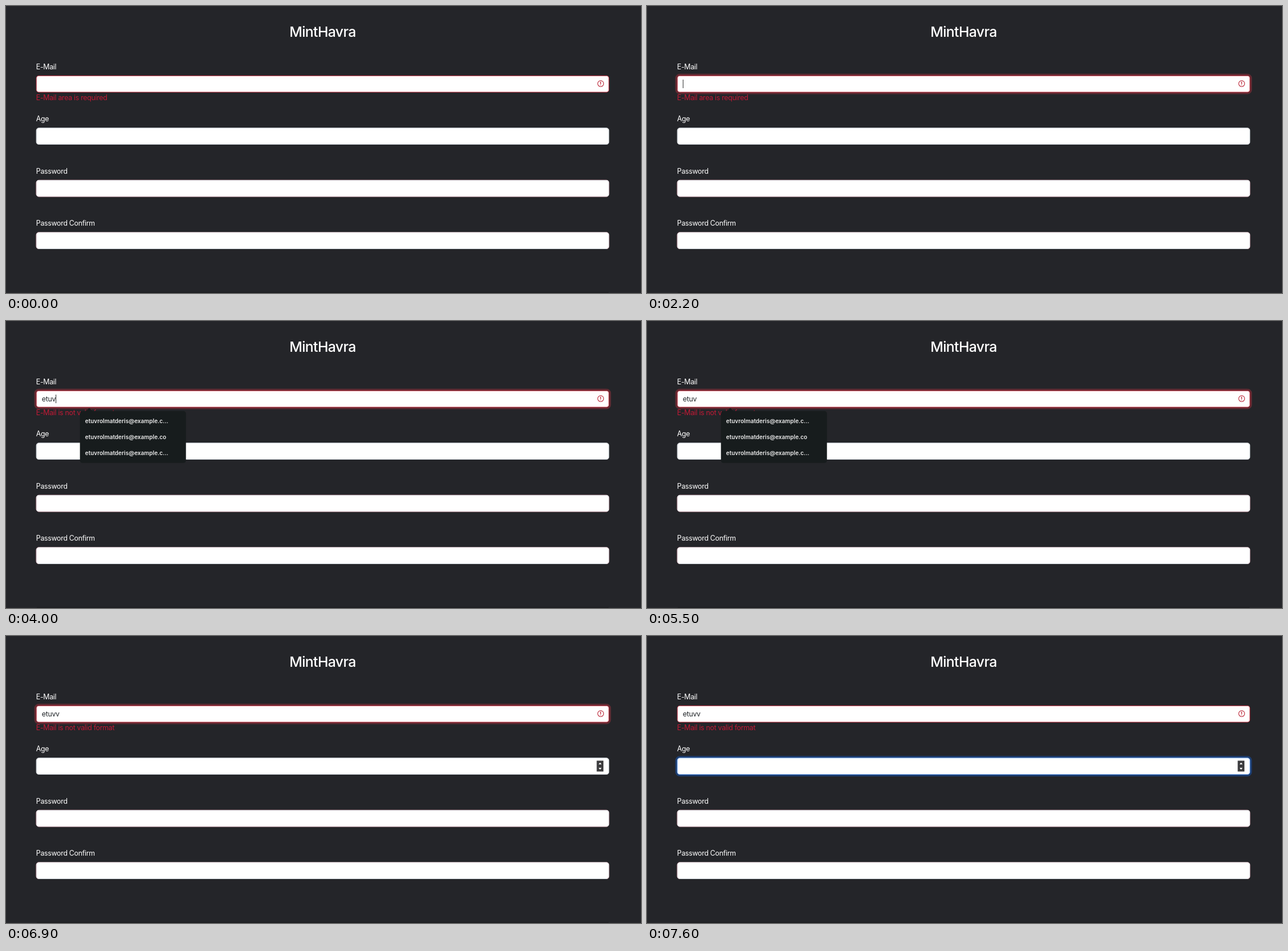
An HTML page that plays this animation: 1114 px wide and 503 px high, repeating every 8000 ms.

```html
<!DOCTYPE html>
<html lang="en">
<head>
<meta charset="utf-8">
<title>Sign-up form</title>
<style>
  html, body { margin: 0; width: 100%; height: 100%; overflow: hidden; background: #242529; }
  svg { display: block; }
  text { font: 400 12.4px Inter, "Open Sans", sans-serif; letter-spacing: -.025em; fill: #fff; white-space: pre; }
  .title { font-size: 24.8px; font-weight: 500; text-anchor: middle; }
  .error { fill: #c21a36; }
  .typed { fill: #212529; }
  .box { fill: #fff; stroke: #ced4da; }
  .box.invalid { stroke: #bd2c3d; }
  .box.focus { stroke: #86b7fe; }
  .ring { fill: none; stroke: #dc3545; }
  .ring.blue { stroke: #0d6efd; }
  .caret { fill: #2b2b2b; }
  .popup { fill: #171c1d; }
  .popup text { font-size: 10px; font-weight: 600; letter-spacing: 0; fill: #ececec; }
</style>
</head>
<body>
<svg width="1114" height="503" viewBox="0 0 1114 503">
  <rect width="1114" height="503" fill="#242529"/>
  <rect x="54" y="501" width="1003" height="2" fill="#1d1e21"/>
  <text class="title" x="555.5" y="53.6">MintHavra</text>
  <g id="form"></g>

  <text id="error" class="error" x="52.8" y="165"></text>
  <text id="typed" class="typed" x="62.8" y="141"></text>
  <rect id="mailCaret" class="caret" x="62.8" y="129" width="1" height="15"/>
  <rect id="ageCaret" class="caret" x="62.8" y="220.5" width="1" height="15"/>

  <g transform="translate(1036.3 129.1) scale(1.16)" fill="#bd2c3d">
    <circle cx="6" cy="6" r="4.5" fill="none" stroke="#bd2c3d"/>
    <path d="M5.8 3.6h.4L6 6.5z" stroke="#bd2c3d" stroke-linejoin="round"/>
    <circle cx="6" cy="8.2" r=".6"/>
  </g>

  <g id="spinner">
    <rect x="1036.3" y="218.5" width="11.8" height="19" fill="#3d3d3f"/>
    <path d="M1039.6 225h5.2l-2.6-3.2zM1039.6 231h5.2l-2.6 3.2z" fill="#fff"/>
  </g>

  <g id="popup" class="popup">
    <path d="M137 158.5q4-.5 6.500-4q2.500-3 5 0q2.500 3.500 6.500 4z"/>
    <rect x="129.700" y="157.800" width="186" height="91" rx="4.500"/>
    <text x="138.800" y="178.500">etuvrolmatderis@example.c...</text>
    <text x="138.800" y="206.500">etuvrolmatderis@example.co</text>
    <text x="138.800" y="234.500">etuvrolmatderis@example.c...</text>
  </g>
</svg>
<script>
const LOOP = 8000;
const RING = 3.1;
const $ = id => document.getElementById(id);

const labels = ["E-Mail", "Age", "Password", "Password Confirm"];
$("form").innerHTML = labels.map((label, i) => {
  const y = 122.3 + i * 91.5;
  const shape = `x="53.2" y="${y}" width="1004.500" height="28.700" rx="4.300"`;
  return `<text x="52.8" y="${y - 11.800}">${label}</text>
    <rect class="ring" ${shape}/><rect class="box" ${shape}/>`;
}).join("");

const rings = document.querySelectorAll(".ring");
const boxes = document.querySelectorAll(".box");
boxes[0].classList.add("invalid");
rings[1].classList.add("blue");

// Each track holds its value until the next time.
const tracks = {
  typed: [[0, ""], [2500, "e"], [2600, "et"], [2800, "etu"], [3000, "etuv"], [6000, "etuvv"]],
  error: [[0, "E-Mail area is required"], [2500, "E-Mail is not valid format"]],
  mailGlow: [[0, 0], [1100, .15], [1200, .6], [1300, 1], [7100, .5], [7200, 0]],
  ageGlow: [[0, 0], [7100, .2], [7200, 1]],
  mailCaret: [[0, 0], [1100, 1], [1600, 0], [2200, 1], [3500, 0], [4000, 1], [4500, 0],
    [5000, 1], [5500, 0], [6000, 1], [6500, 0], [7000, 1], [7100, 0]],
  ageCaret: [[0, 0], [7100, 1], [7600, 0]],
  popup: [[0, 0], [2500, 1], [6000, 0]],
  spinner: [[0, 0], [6600, 1]]
};

const at = (name, t) => tracks[name].findLast(([start]) => start <= t)[1];

function show(id, on) {
  $(id).style.visibility = on ? "visible" : "hidden";
}

function glow(ring, amount) {
  ring.style.strokeWidth = 1 + 2 * RING * amount;
  ring.style.strokeOpacity = .33 * amount;
}

function draw(now) {
  const t = now % LOOP;
  for (const id of ["mailCaret", "ageCaret", "popup", "spinner"]) show(id, at(id, t));
  for (const id of ["typed", "error"]) {
    const value = at(id, t);
    if ($(id).textContent !== value) $(id).textContent = value;
  }
  $("mailCaret").setAttribute("x", 62.8 + $("typed").getComputedTextLength());
  glow(rings[0], at("mailGlow", t));
  glow(rings[1], at("ageGlow", t));
  boxes[1].classList.toggle("focus", at("ageGlow", t) > 0);
}

const begin = performance.now();
function tick() {
  draw(performance.now() - begin);
  requestAnimationFrame(tick);
}
tick();
</script>
</body>
</html>
```
